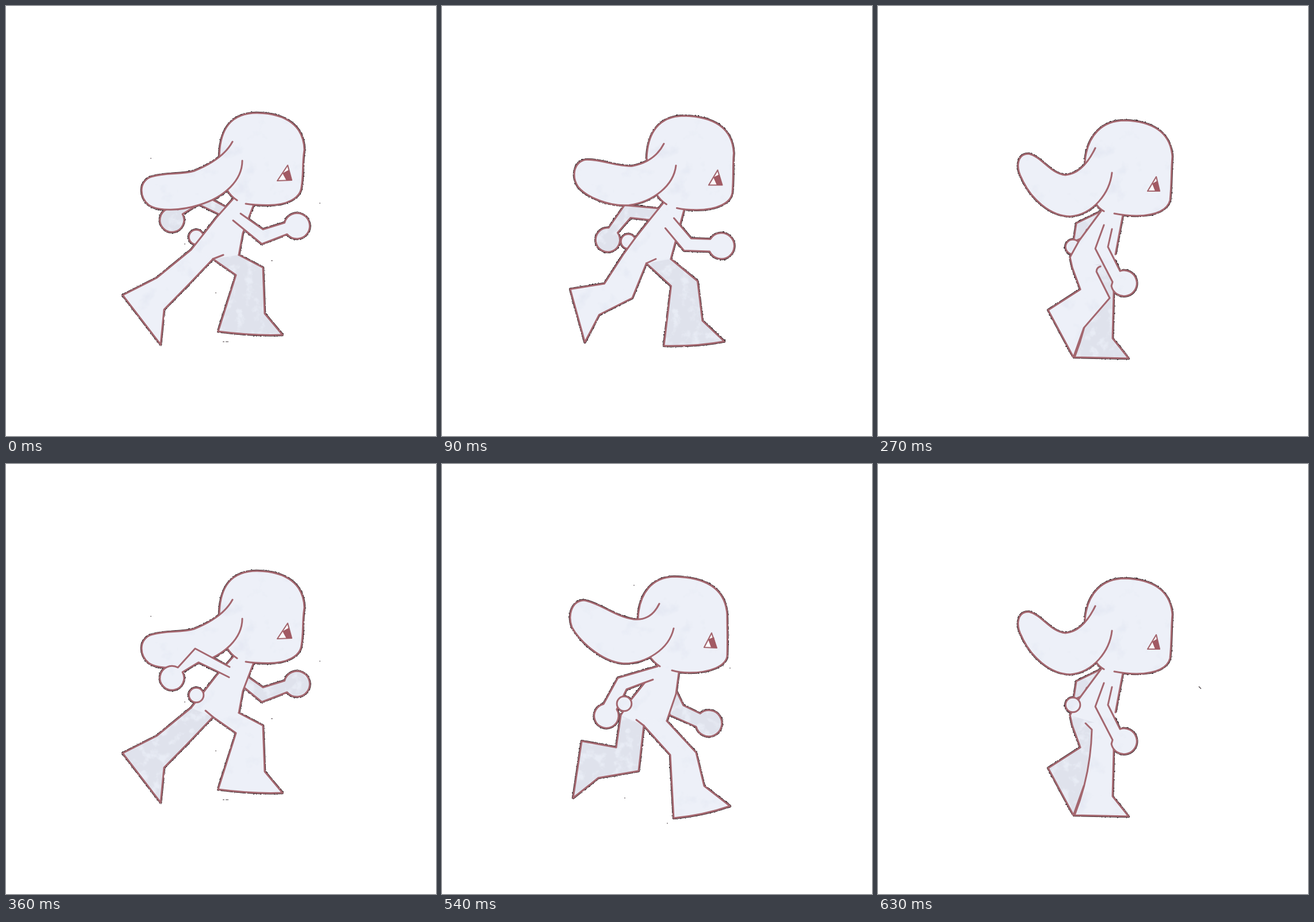
Animation, 748 px wide and 748 px high, one loop 0.72 s. Source, as an HTML page:

```html
<!DOCTYPE html>
<html lang="en">
<head>
<meta charset="utf-8">
<title>Running creature</title>
<style>
html, body { margin: 0; width: 100%; height: 100%; overflow: hidden; background: #fff; }
svg { display: block; width: 100vw; height: 100vh; }
path { fill: none; stroke-linejoin: round; }
.pose { visibility: hidden; animation: show .72s step-end infinite; }
@keyframes show { 0% { visibility: visible; } 12.5%, 100% { visibility: hidden; } }
.rim path { stroke: #2f2126; stroke-width: 4.5; }
.line { stroke: #a4676f; stroke-width: 3; stroke-linecap: round; }
.light { fill: #edf0f8; stroke: #edf0f8; }
.shade { fill: #dfe2ec; stroke: #dfe2ec; }
.eye { fill: #fbfafc; stroke: #a4676f; stroke-width: 2.2; }
.pupil { fill: #a25a63; }
.speck { stroke: #4a4045; stroke-width: 1.2; }
</style>
</head>
<body>
<svg viewBox="0 0 748 748">
  <defs>
    <filter id="rough" filterUnits="userSpaceOnUse" x="180" y="170" width="400" height="470">
      <feTurbulence type="fractalNoise" baseFrequency=".35" numOctaves="2" seed="4"/>
      <feDisplacementMap in="SourceGraphic" scale="2.8" xChannelSelector="R" yChannelSelector="G"/>
    </filter>
    <filter id="pale" color-interpolation-filters="sRGB">
      <feTurbulence type="fractalNoise" baseFrequency=".06" numOctaves="5" seed="7"/>
      <feColorMatrix values="0 0 0 0 .91  0 0 0 0 .925  0 0 0 0 .96  0 0 0 4 -2"/>
      <feComposite in2="SourceAlpha" operator="in" result="spots"/>
      <feMerge><feMergeNode in="SourceGraphic"/><feMergeNode in="spots"/></feMerge>
    </filter>
    <filter id="dusk" color-interpolation-filters="sRGB">
      <feTurbulence type="fractalNoise" baseFrequency=".03" numOctaves="4" seed="12"/>
      <feColorMatrix values="0 0 0 0 .9  0 0 0 0 .915  0 0 0 0 .955  0 0 0 4 -2.4"/>
      <feComposite in2="SourceAlpha" operator="in" result="spots"/>
      <feMerge><feMergeNode in="SourceGraphic"/><feMergeNode in="spots"/></feMerge>
    </filter>
  </defs>
  <g id="stage"></g>
</svg>
<script>
const disc = (x, y, r) => `M${x - r},${y} A${r},${r} 0 1 1 ${x + r},${y} A${r},${r} 0 1 1 ${x - r},${y}`;

// Pairs list the part that is nearer in the first and in the second stride.
const stretch = {
  head: 'M402,338 Q391,331 384,319 L371,262 C372,215 390,186 437,186 C489,187 518,210 519,250 C515,275 518,290 514,315 C512,335 488,346.5 456,346.5 C440,346.5 428,346 417,344',
  ear: 'M394,236 C380,262 352,277 327,287 C305,294 275,289 250,298 C231,308 232,332 248,346 C265,358 305,356 336,346 C380,333 411,303 411,269',
  eye: 'M490,277 L472,304 L497,303 Z',
  pupil: 'M481,291 L492,285 L497,303 L488,304 Z',
  torso: 'M322,424 L345,395 L366,368 L400,330 L433,340 L412,395 L405,433',
  hips: 'M322,424 L360,440 L405,433 Z',
  tail: disc(331, 402, 12.8),
  arms: [
    'M408,361 L447,388.5 L484.5,377 A22.3,22.3 0 1 1 489,397 L445,414 L395,373',
    'M389,353 L329,321 L299,354 A21,21 0 1 0 307,362 L335,345 L366,360 L388,371'
  ],
  legs: [
    'M322,424 L262,473 L203,503 L269,589 L275,528 L320,482 L360,440',
    'M405,433 L447,455 L450,535 L481,572 Q430,574 369,566 L400,468 L360,440'
  ],
  marks: ['M360,440 L378,433', 'M347,429 L360,440'],
  specks: 'M251,265h2 M545,343h2 M461,443h3 M364,499h2 M377,584h3 M382,584h5 M310,414h2'
};

const land = {
  head: 'M379,352 Q368,345 361,334 L341,268 C343,225 365,197 404,196 C455,197 493,214 496,262 C496,280 497,310 496,335 C493,351 468,363 430,363 C420,363 410,362 400,359',
  ear: 'M378,243 C368,264 352,272 333,270 C300,265 275,242 247,237 C226,238 218,262 226,284 C238,306 275,343 315,347 C355,348 395,322 403,286',
  eye: 'M469,294 L456,319 L478,320 Z',
  pupil: 'M463,305 L473,301 L478,320 L468,319 Z',
  torso: 'M311,437 L328,411 L353,380 L378,345 L413,355 L407,400 L391,447',
  hips: 'M311,437 L351,455 L391,447 Z',
  tail: disc(317, 417, 12.8),
  arms: [
    'M399,377 L420,420 L449,434 A22.8,22.8 0 1 1 442,457 L397,437 L382,400',
    'M375,352 L306,372 L281,417.5 A21.2,21.2 0 1 0 304,427 L321,392 L345,383 L367,375'
  ],
  legs: [
    'M311,437 L303,493 L243,482 L228,581 L272,546 L342,534 L351,455',
    'M391,447 L442,502 L456,560 L501,595 Q455,611 403,616 L397,506 L351,455'
  ],
  marks: ['M351,455 L366,447', 'M338,445 L351,455'],
  specks: 'M333,211h2 M500,355h2 M317,581h2 M391,625h2'
};

const pass = {
  head: 'M393,357 Q384,352 380,345 L360,270 C364,225 390,199 430,199 C478,201 509,220 512,262 C510,285 511,310 508,338 C504,354 485,364.5 450,365 C435,365 422,363 411,361',
  ear: 'M378,247 C366,272 350,292 326,294 C300,292 285,262 262,257 C242,257 239,280 250,300 C265,335 300,366 335,366 C375,362 403,325 407,290',
  eye: 'M484,297 L469,322 L490,322 Z',
  pupil: 'M477,309 L486,304 L490,322 L482,322 Z',
  torso: 'M334,437 L350,408 L393,350 L427,358 L419,400 L413,432',
  hips: 'M334,437 L413,432 L410,470 L387,453 L338,455 Z',
  tail: disc(339, 419, 12.8),
  fixedArms: true,
  arms: [
    'M407,388 L400,419 L421,461 A22.4,22.4 0 1 1 406,487 L408,480 L378,422 L393,381',
    'M386,358 L345,378 L340,410 L358,402 L363,389 L367,390'
  ],
  legs: [
    'M334,437 L338,455 L352,493 L296,529 L340,611 L358,560 L403,508 L380,462 Q380,455 387,453',
    'M361,451 L372,462 Q370,540 342,611 L436,613 L408,578 L410,500 L409,447'
  ],
  marks: ['', ''],
  specks: ''
};

// Averages two paths of the same structure.
function between(a, b) {
  if (Array.isArray(a)) return a.map((d, i) => between(d, b[i]));
  const num = /-?\d+(\.\d+)?/g, other = b.match(num) || [];
  let i = 0;
  return a.replace(num, n => (+n + +other[i++]) / 2);
}

const drop = { specks: '' };
for (const key in stretch) {
  if (key !== 'specks') drop[key] = between(stretch[key], land[key]);
}

const path = (d, cls) => `<path class="${cls}" d="${d}"/>`;
const fill = (d, tone = 'light') =>
  `<path class="${tone}" filter="url(#${tone === 'shade' ? 'pale' : 'dusk'})" d="${d}"/>`;
const part = (d, tone) => fill(d, tone) + path(d, 'line');

function draw(p, stride, index) {
  const side = p.fixedArms ? 0 : stride;
  const nearArm = p.arms[side], farArm = p.arms[1 - side];
  const nearLeg = p.legs[stride], farLeg = p.legs[1 - stride];
  const rim = [farArm, p.tail, farLeg, p.torso, nearLeg, p.head, p.ear, nearArm]
    .map(d => path(d, '')).join('');
  const tail = part(p.tail);
  return `<g class="pose" style="animation-delay:${index * 90 - 720}ms">
    <g class="rim" filter="url(#rough)">${rim}</g>
    ${part(farArm, 'shade')}${stride ? '' : tail}
    ${fill(p.hips)}${part(farLeg, 'shade')}${part(p.torso)}${part(nearLeg)}
    ${path(p.marks[stride], 'line')}
    ${part(p.head)}${part(p.ear)}${path(p.eye, 'eye')}${path(p.pupil, 'pupil')}
    ${part(nearArm)}${stride ? tail : ''}
    ${path(p === pass && stride ? 'M558,387l4,4' : p.specks, 'speck')}
  </g>`;
}

const cycle = [stretch, drop, land, pass];
document.getElementById('stage').innerHTML =
  [0, 1].map(s => cycle.map((p, i) => draw(p, s, s * 4 + i)).join('')).join('');
</script>
</body>
</html>
```
